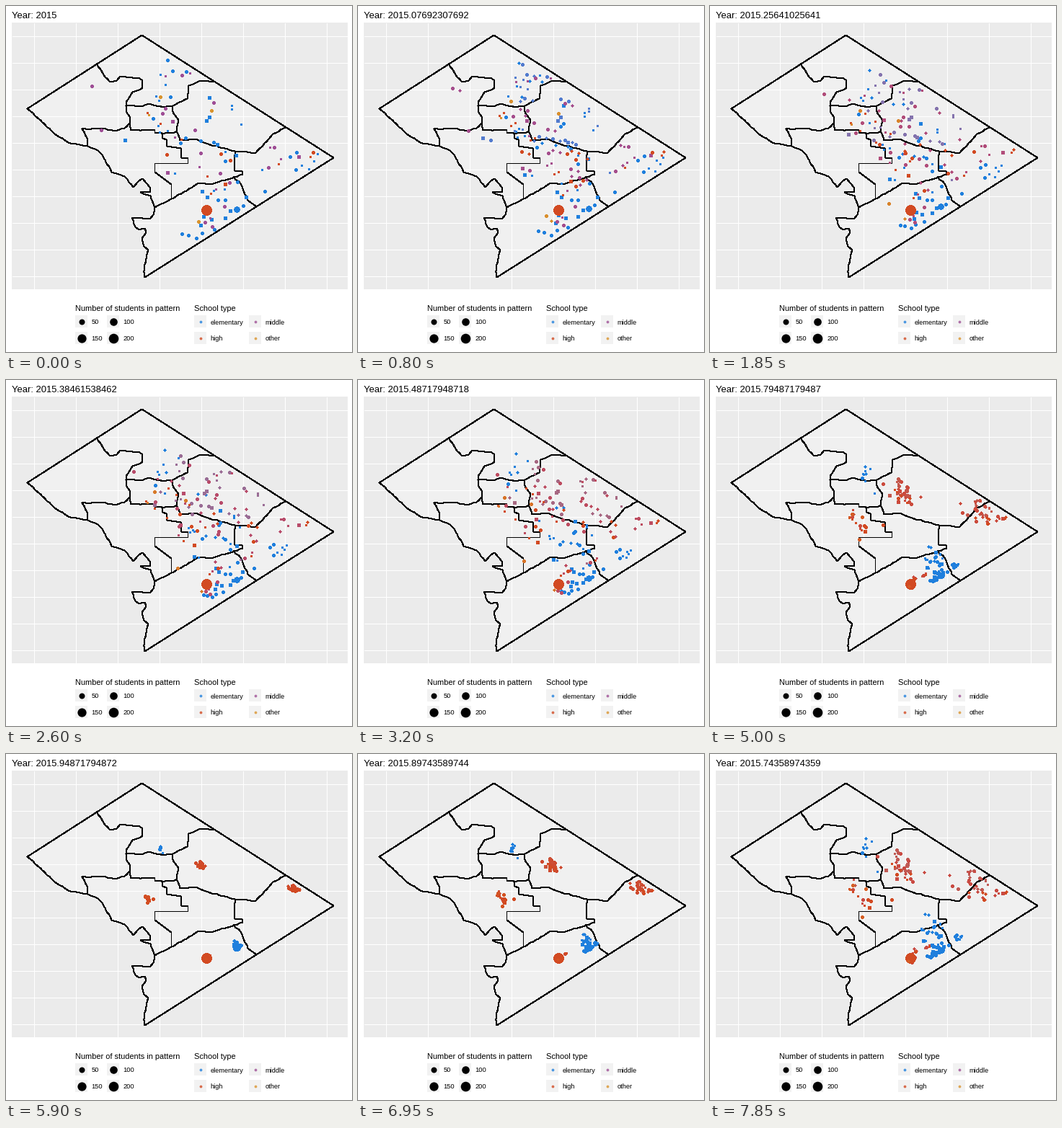
A matplotlib script for the animation above (8 s loop, 480 by 480 pixels).

```python
import numpy as np
import matplotlib.pyplot as plt
from matplotlib.animation import FuncAnimation
from matplotlib.colors import to_rgb

plt.rcParams["font.family"] = "Liberation Sans"
SIZE, DPI, INTERVAL, LOOP = 480, 72, 50, 8000
STEPS = 39
ALPHA = 0.8
SMALL, MEDIUM, LARGE = 1.4, 2, 2.5

COLORS = {"elementary": "#1f7fdd", "middle": "#9f4f96",
          "high": "#d24a22", "other": "#d9942f"}
# Destination schools: position and the type a dot turns into.
GOALS = {"A": (271, 153, "high"), "B": (406, 187, "high"),
         "C": (192, 201, "high"), "D": (321, 268, "elementary"),
         "E": (278, 283, "high"), "F": (213, 131, "elementary")}

TO_XYZ = np.array([[.4124, .3576, .1805], [.2126, .7152, .0722],
                   [.0193, .1192, .9505]])
WHITE = TO_XYZ.sum(axis=1)


def rgb_to_lab(rgb):
    rgb = np.asarray(rgb)
    lin = np.where(rgb > .04045, ((rgb + .055) / 1.055) ** 2.4, rgb / 12.92)
    f = np.cbrt(lin @ TO_XYZ.T / WHITE)
    return np.stack([116 * f[..., 1] - 16, 500 * (f[..., 0] - f[..., 1]),
                     200 * (f[..., 1] - f[..., 2])], axis=-1)


def lab_to_rgb(lab):
    fy = (lab[..., 0] + 16) / 116
    f = np.stack([fy + lab[..., 1] / 500, fy, fy - lab[..., 2] / 200], axis=-1)
    lin = np.clip(f ** 3 * WHITE @ np.linalg.inv(TO_XYZ).T, 0, 1)
    return np.where(lin > .0031308, 1.055 * lin ** (1 / 2.4) - .055, lin * 12.92)


starts, ends, radii, from_rgb, to_rgbs = [], [], [], [], []


def schools(kind, r, *places):
    """Each place is x, y and the goals its dots leave for."""
    for x, y, goals in places:
        for i, goal in enumerate(goals):
            gx, gy, goal_kind = GOALS[goal]
            starts.append((x, y))
            ends.append((gx, gy))
            radii.append(r if i == 0 else max(SMALL, .8 * r))
            from_rgb.append(to_rgb(COLORS[kind]))
            to_rgbs.append(to_rgb(COLORS[goal_kind]))


schools("elementary", SMALL,
        (214, 95, "AB"), (255, 93, "F"), (221, 109, "FAB"), (208, 125, "F"),
        (212, 131, "F"), (313, 138, "BD"), (313, 143, "BD"), (326, 164, "BD"),
        (211, 166, "D"), (213, 175, "DA"), (224, 173, "FAD"), (234, 232, "D"))
schools("elementary", SMALL,
        (304, 202, "D"), (432, 205, "D"), (427, 215, "D"), (422, 209, "D"),
        (420, 226, "D"), (410, 221, "D"), (355, 227, "E"), (288, 256, "F"),
        (303, 254, "D"))
schools("elementary", MEDIUM,
        (224, 75, "AF"), (231, 90, "ABD"), (250, 91, "BD"), (228, 126, "ABCF"),
        (204, 156, "F"), (249, 183, "ABD"), (242, 190, "DA"),
        (270, 187, "ABD"), (288, 189, "ABD"), (304, 215, "D"))
schools("elementary", MEDIUM,
        (403, 203, "D"), (394, 209, "D"), (402, 227, "D"), (359, 257, "D"),
        (321, 244, "D"), (294, 269, "D"), (304, 269, "D"), (329, 277, "D"),
        (289, 310, "D"), (272, 315, "D"), (264, 322, "D"), (253, 318, "D"),
        (244, 316, "D"))
schools("elementary", LARGE,
        (282, 127, "DAB"), (282, 154, "AD"), (278, 159, "AD"),
        (293, 192, "ABD"), (165, 186, "AB"), (224, 231, "D"), (319, 207, "D"),
        (272, 257, "D"), (279, 265, "D"), (333, 265, "D"), (311, 284, "D"),
        (304, 294, "D"), (285, 296, "D"), (274, 292, "D"), (270, 304, "D"))
schools("elementary", 3.6, (320, 282, "D"))
schools("middle", SMALL,
        (221, 97, "CB"), (255, 93, "B"), (234, 182, "A"), (268, 223, "AC"),
        (366, 196, "B"), (381, 212, "EB"), (291, 254, "E"), (283, 294, "E"))
schools("middle", MEDIUM,
        (244, 96, "A"), (119, 111, "AB"), (288, 134, "AB"), (217, 149, "CB"),
        (221, 142, "BA"), (262, 172, "AB"), (132, 172, "B"), (270, 204, "CAB"),
        (297, 232, "AEB"), (372, 196, "BA"), (364, 224, "EB"),
        (310, 245, "ABE"), (303, 278, "E"), (276, 300, "E"), (286, 306, "E"))
schools("middle", LARGE, (231, 160, "AB"), (224, 231, "AB"), (406, 209, "B"))
schools("high", SMALL,
        (196, 148, "AC"), (214, 163, "CA"), (243, 185, "AC"), (279, 236, "CA"),
        (422, 209, "B"), (378, 219, "E"), (284, 260, "E"))
schools("high", MEDIUM,
        (223, 206, "AB"), (298, 205, "CAB"), (311, 214, "CB"), (426, 203, "CB"))
schools("high", LARGE, (304, 247, "CBE"))
schools("high", 7, (278, 283, "E"))
schools("other", SMALL, (198, 151, "C"))
schools("other", MEDIUM, (214, 126, "C"), (285, 145, "C"), (267, 299, "CE"))

starts, ends, radii = map(np.array, (starts, ends, radii))
lab_from, lab_to = rgb_to_lab(from_rgb), rgb_to_lab(to_rgbs)

fig = plt.figure(figsize=(SIZE / DPI, SIZE / DPI), dpi=DPI, facecolor="white")
ax = fig.add_axes([0, 0, 1, 1])
ax.set(xlim=(0, SIZE), ylim=(SIZE, 0))
ax.axis("off")


def box(x, y, w, h, color):
    ax.add_patch(plt.Rectangle((x, y), w, h, fc=color, lw=0, zorder=0))


def line(points, color="black", z=2):
    x, y = np.array(points).T + .5
    ax.plot(x, y, color=color, lw=1, antialiased=False, zorder=z,
            solid_joinstyle="round")


def dots(xy, r, color, alpha=1):
    return ax.scatter(*np.transpose(xy), s=(2 * np.asarray(r)) ** 2, c=color,
                      alpha=alpha, lw=0, antialiased=False, zorder=3)


def label(x, y, text, size):
    return ax.text(x, y, text, fontsize=size, color="black", va="baseline")


rng = np.random.default_rng(4)


def rough(*points):
    """Subdivide a path and shake the inner points like a surveyed border."""
    points = np.array(points, float)
    out = [points[:1]]
    for a, b in zip(points, points[1:]):
        n = max(1, int(np.hypot(*(b - a)) // 4))
        part = a + (b - a) * np.linspace(0, 1, n + 1)[1:, None]
        part[:-1] += rng.uniform(-.7, .7, part[:-1].shape)
        out.append(part)
    return np.concatenate(out)


# Panel and grid
box(8, 23, 466, 370, "#ebebeb")
for gx in range(38, 474, 58):
    line([(gx, 23), (gx, 392)], "white", 1)
for gy in range(41, 393, 37):
    line([(8, gy), (473, gy)], "white", 1)

# City outline
upper_river = rough(
    (29, 142), (40, 152), (66, 176), (86, 189), (113, 194), (127, 200),
    (133, 206), (146, 230), (164, 236), (176, 251), (182, 244), (189, 239),
    (199, 251), (200, 257), (186, 258), (200, 263), (206, 279))
lower_river = rough(
    (206, 279), (204, 289), (199, 295), (174, 293), (179, 306), (184, 310),
    (192, 308), (194, 313), (188, 322), (191, 333), (197, 338), (194, 350),
    (191, 360), (192, 376))
outline = np.vstack([upper_river, lower_river,
                     [(454, 210), (188, 40), (29, 142)]])
ax.fill(*(outline.T + .5), color="white", alpha=.25, lw=0, zorder=1.5)
line(outline)

# Ward borders
line(rough((126, 81), (137, 98), (143, 104), (153, 103), (158, 97), (183, 99),
           (188, 102), (189, 113), (175, 119), (166, 133), (166, 145),
           (171, 153), (171, 162)))
line(rough((166, 138), (190, 138), (197, 135), (218, 140), (231, 138),
           (251, 128), (253, 110), (270, 103), (288, 104)))
line(rough((231, 138), (230, 144), (239, 158), (236, 173), (241, 186),
           (262, 184), (280, 191), (317, 201), (346, 203), (358, 190),
           (370, 177), (388, 168)))
line(rough((105, 170), (133, 169), (150, 173), (164, 169), (171, 162),
           (173, 172), (206, 171), (206, 176), (232, 176), (236, 173)))
line(rough((105, 170), (112, 183), (113, 194)))
line(rough((317, 201), (317, 228), (327, 229), (328, 233), (287, 246),
           (265, 246), (250, 256), (206, 279)))
line(rough((315, 237), (325, 246), (335, 269), (347, 278)))
line([(216, 176), (217, 183), (222, 185), (223, 194), (242, 197), (243, 210),
      (252, 211), (252, 218), (206, 218), (206, 230), (229, 247), (229, 268)])

# Legends
label(96, 423, "Number of students in pattern", 11)
label(261, 423, "School type", 11)
for i, r in enumerate((4, 5.3, 6.1, 6.8)):
    x, y = 104.5 + 44 * (i % 2), 437.5 + 23 * (i // 2)
    box(x - 8.5, y - 8.5, 17, 17, "#f2f2f2")
    dots([(x, y)], r, "black")
    label(x + 14, y + 3.5, str(50 * (i + 1)), 9.2)
for i, kind in enumerate(("elementary", "middle", "high", "other")):
    x, y = 269.5 + 76 * (i % 2), 437.5 + 23 * (i // 2)
    box(x - 8.5, y - 8.5, 17, 17, "#f2f2f2")
    dots([(x, y)], 1.9, COLORS[kind], ALPHA)
    label(x + 14, y + 4, kind, 9.2)

title = label(8, 17, "", 13)
moving = dots(starts, radii, from_rgb)


def step_at(ms):
    """Hold the first year, walk to the next one, then walk back."""
    if ms < 500:
        return 0
    k = (ms - 500) // 150 + 1
    return min(k, 2 * STEPS + 1 - k)


def update(frame):
    t = step_at(frame * INTERVAL) / STEPS
    title.set_text(f"Year: {2015 + t:.15g}")
    moving.set_offsets(np.round(starts + (ends - starts) * t) + .5)
    rgb = lab_to_rgb(lab_from + (lab_to - lab_from) * t)
    moving.set_facecolors(np.column_stack([rgb, np.full(len(rgb), ALPHA)]))
    return title, moving


anim = FuncAnimation(fig, update, frames=LOOP // INTERVAL, interval=INTERVAL,
                     repeat=True, repeat_delay=0, init_func=lambda: update(0))
plt.show()
```
